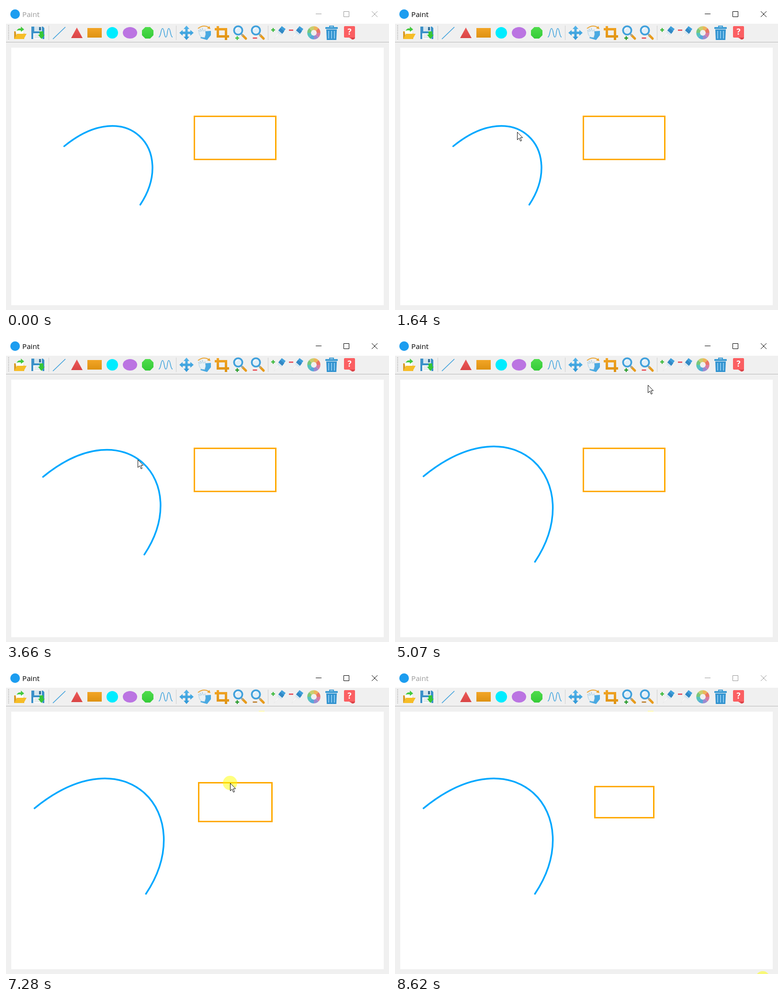
Recreate the animation shown at these times as an HTML page. Size 800x635 px, loop 8.7 s.

```html
<!DOCTYPE html>
<html lang="en">
<head>
<meta charset="utf-8">
<title>Paint</title>
<style>
  html, body { margin: 0; width: 100%; height: 100%; overflow: hidden; background: #f0f0f0; }
  svg { display: block; width: 800px; height: 635px; }
  text { font-family: "Open Sans", "Noto Sans", sans-serif; }
  .line { fill: none; }
</style>
</head>
<body>
<svg viewBox="0 0 800 635" xmlns="http://www.w3.org/2000/svg">
  <defs>
    <linearGradient id="red" x2="0" y2="1"><stop stop-color="#ed5a58"/><stop offset="1" stop-color="#d94545"/></linearGradient>
    <linearGradient id="orange" x2="0" y2="1"><stop stop-color="#f2a526"/><stop offset="1" stop-color="#de9212"/></linearGradient>
    <linearGradient id="green" x2="0" y2="1"><stop stop-color="#4fdc4c"/><stop offset="1" stop-color="#35cb38"/></linearGradient>
    <linearGradient id="blue" x2="0" y2="1"><stop stop-color="#55b5ea"/><stop offset="1" stop-color="#2f97d6"/></linearGradient>
    <g id="lens">
      <path d="M6 5L13 12" stroke="#e79b1c" stroke-width="5" stroke-linecap="round"/>
      <path d="M3 2L7 6" stroke="#9aa7b0" stroke-width="3"/>
      <circle cx="-3" cy="-5" r="8.7" fill="#e3eff7" stroke="#3fa0dc" stroke-width="3.6"/>
      <path class="line" d="M-8 -6Q-7 -10 -3 -10" stroke="#fff" stroke-width="1.5"/>
    </g>
    <g id="pin">
      <path d="M0 4L-9 13L-7 9L-2 2Z" fill="#fff" stroke="#e2e2e2" stroke-width=".7"/>
      <path d="M0 -5L7 -14L15 -8L8 2Z" fill="#3e9fdb"/>
      <path d="M0 -5L4 -10L12 -3L8 2Z" fill="#3288c4"/>
      <path d="M-1 -4L8 3L6 5L-2 -1Z" fill="#d3e6f2"/>
    </g>
  </defs>

  <rect width="800" height="635" fill="#f0f0f0"/>
  <rect width="800" height="37" fill="#fff"/>
  <circle cx="19" cy="17" r="10" fill="#1c9df0"/>
  <g id="caption">
    <text x="34" y="23" font-size="15.2" fill="currentColor">Paint</text>
    <path class="line" d="M647 16.5H659M705.5 11.5H716.5V22.5H705.5ZM764 11L776 23M776 11L764 23" stroke="currentColor"/>
  </g>

  <path d="M0 75.5H800" stroke="#b8b8b8"/>
  <path d="M5.5 40V71" stroke="#a5a5a5" stroke-width="1.6" stroke-dasharray="1.5 2"/>
  <path d="M89.5 41V71M355.5 41V71M547.5 41V71" stroke="#d0d0d0"/>

  <g transform="translate(30 56)">
    <path d="M-13 13V-3H-6L-4 0H8V13Z" fill="#d99a22"/>
    <path d="M-10 -6L6 -7L8 7H-8Z" fill="#fff" stroke="#ddd" stroke-width=".6"/>
    <path d="M-8 -4Q-5 -10 1 -9V-13L8 -7L1 -2V-5Q-4 -6 -8 -4Z" fill="#45c93f"/>
    <path d="M-7 2H13L7 13H-13Z" fill="#f6bd27"/>
  </g>
  <g transform="translate(67 56)">
    <path d="M-14 -13H10L13 -10V13H-14Z" fill="#3b91c9"/>
    <rect x="-8" y="-13" width="16" height="10" fill="#d6e5ee"/>
    <rect x="2" y="-12" width="4" height="7" fill="#316e98"/>
    <rect x="-10" y="1" width="19" height="12" fill="#fff"/>
    <path d="M-8 4H7M-8 7H5M-8 10H6" stroke="#b9c7cf"/>
    <path d="M3 -3H11V4H14L7 13L0 4H3Z" fill="#36c637"/>
  </g>
  <path d="M98 69L124 44" stroke="#3ca0dc" stroke-width="1.6"/>
  <path d="M148 45L160 67H136Z" fill="url(#red)"/>
  <rect x="170" y="46" width="30" height="20" fill="url(#orange)"/>
  <circle cx="222" cy="56" r="12" fill="#00ecff"/>
  <ellipse cx="259" cy="56" rx="15" ry="12" fill="#bb74e2"/>
  <path d="M291 44H301L308 51V61L301 68H291L284 61V51Z" fill="url(#green)"/>
  <path class="line" d="M319 65C324 65 323 47 327 47S330 65 334 65S336 47 340 47S343 65 348 65" stroke="#48a7de" stroke-width="1.6"/>
  <path transform="translate(377 56)" fill="url(#blue)" d="M0 -15L6 -8H2.5V-2.5H8V-6L15 0L8 6V2.5H2.5V8H6L0 15L-6 8H-2.5V2.5H-8V6L-15 0L-8 -6V-2.5H-2.5V-8H-6Z"/>
  <g transform="translate(414 56)">
    <path d="M-1 -3L14 -4L14 5L6 15L-8 11Z" fill="#48a9e2"/>
    <path d="M-12 -6L-8 -2L-9 -9L-5 -3L-4 -10L-1 -3L2 -7L3 3L1 10L-6 9L-10 4Z" fill="#e8f1f6" stroke="#9ec6dd" stroke-width=".8"/>
    <path class="line" d="M-13 -9Q-1 -18 10 -11" stroke="#eaa12a" stroke-width="1.8"/>
    <path d="M13 -8L6 -9L11 -14Z" fill="#eaa12a"/>
  </g>
  <path transform="translate(451 56)" class="line" d="M-15 -7.5H8.5V15M-8.5 -14V7.5H15" stroke="url(#orange)" stroke-width="5"/>
  <use href="#lens" x="488" y="56"/>
  <path id="plus" d="M479 67H487M483 63V71" stroke-width="2.4"/>
  <use href="#lens" x="525" y="56"/>
  <path id="minus" d="M515.5 67H524.5" stroke-width="2.6"/>
  <use href="#pin" x="569" y="56"/>
  <path d="M554 50H562M558 46V54" stroke="#3cba3c" stroke-width="2.5"/>
  <use href="#pin" x="606" y="56"/>
  <path d="M591 50.5H600" stroke="#e64a55" stroke-width="2.6"/>
  <g id="wheel" transform="translate(643 56)"/>
  <g transform="translate(680 56)">
    <path class="line" d="M-4 -11V-14H4V-11" stroke="#3a9bd4" stroke-width="2"/>
    <rect x="-13" y="-12" width="26" height="4" rx="1" fill="#3a9bd4"/>
    <path d="M-11 -7H11L10 15H-10Z" fill="#3494d0"/>
    <path d="M-6 -4V12M0 -4V12M6 -4V12" stroke="#8ccaf0" stroke-width="2"/>
  </g>
  <path d="M708 42H727Q729 42 729 44V67Q728 70 723 70L717 66H708Q706 66 706 64V44Q706 42 708 42Z" fill="#fb5f62"/>
  <path d="M717 66Q722 67 723 70Q728 70 729 66Z" fill="#d94248"/>
  <text x="717.5" y="60" font-size="17" font-weight="700" text-anchor="middle" fill="#fff">?</text>

  <rect x="11" y="87" width="778" height="538" fill="#fff"/>
  <path id="trace" d="M528 86H540" stroke="#fff9b0" stroke-width="2"/>
  <path id="curve" class="line" d="M121.5 293C252.6 185.9 355.8 301.7 280.5 415" stroke="#00a8ff" stroke-width="3.5" stroke-linecap="round" vector-effect="non-scaling-stroke"/>
  <path id="box" class="line" stroke="#ffaa00" stroke-width="3"/>

  <g id="pointer">
    <circle id="press" r="15" fill="#ff0" fill-opacity=".5"/>
    <path d="M.5 .5V16.5L4.2 13L7 19.3L9.4 18.2L6.7 12H11.6Z" fill="#fff" stroke="#111"/>
  </g>
</svg>
<script>
const LOOP = 8700, TICK = 78;
const $ = id => document.getElementById(id);

// Pointer runs: start time, then one position per tick; the last one holds.
const runs = [
  [0, "768,644"],
  [70, "641,518 600,420 555,290 510,165 480,95 468,66 484,63"],
  [1090, "482,72 460,105 410,165 340,222 275,258 239,265 246,264 255,263"],
  [1870, "255,263 258,262 261,262 263,262"],
  [2340, "263,262 265,261 267,260 269,260"],
  [3120, "272,258 275,257"],
  [3500, "275,257 275,255 275,254"],
  [4280, "275,254 276,254 278,253 280,253"],
  [4670, "284,248 318,228 385,185 455,140 505,112 528,98 535,80 532,69 529,73"],
  [5790, "526,84 512,120 494,160 480,196 472,218 470,224"],
  [6430, "468,231"],
  [7050, "468,235"],
  [7280, "468,236"],
  [7510, "468,238"],
  [7750, "468,239"],
  [7910, "468,239 468,239 480,262 540,345 625,455 700,555 768,644"]
].map(([start, path]) => ({ start, points: path.split(" ") }));

const presses = [
  [780, 860], [1870, 1950], [2340, 2420], [2810, 2970], [3500, 3580], [4280, 4360],
  [5550, 5630], [6660, 6740], [7280, 7380], [7910, 7990], [8620, LOOP]
];
const zoomIns = [2420, 2970, 3580, 4360];
const zoomOuts = [6740, 7380, 7990];

const passed = (times, t) => times.filter(time => time <= t).length;

function pointerAt(t) {
  const run = runs.findLast(r => r.start <= t);
  const step = Math.floor((t - run.start) / TICK);
  return run.points[Math.min(step, run.points.length - 1)];
}

function boxPath(scale) {
  const edge = (center, half) => Math.round(center + half * scale) + 0.5;
  const [left, right] = [-85, 85].map(h => edge(478.47, h));
  const [top, bottom] = [-45, 45].map(h => edge(275.47, h));
  return `M${left} ${top}H${right}V${bottom}H${left}Z`;
}

function drawWheel() {
  const colors = ["#edb65a", "#ea7564", "#d77ba4", "#9a8bd0", "#55a9da", "#55c3bd", "#7bc77a", "#c8cf70"];
  const at = (i, r) => {
    const a = i * 2 * Math.PI / colors.length - Math.PI / 2;
    return `${r * Math.cos(a)} ${r * Math.sin(a)}`;
  };
  $("wheel").innerHTML = colors.map((color, i) =>
    `<path fill="${color}" d="M${at(i, 6)}L${at(i, 13.7)}A13.7 13.7 0 0 1 ${at(i + 1, 13.7)}L${at(i + 1, 6)}A6 6 0 0 0 ${at(i, 6)}"/>`
  ).join("");
}

function render(t) {
  $("caption").style.color = t >= 780 && t < 8620 ? "#000" : "#999";
  $("plus").style.stroke = t < 780 ? "#42c544" : "#279b2b";
  $("minus").style.stroke = t < 6660 ? "#e84850" : "#bd7c28";
  $("trace").style.visibility = t < 5630 ? "hidden" : "visible";
  const zoom = 1.1 ** passed(zoomIns, t);
  $("curve").setAttribute("transform", `translate(255 302) scale(${zoom}) translate(-255 -302)`);
  $("box").setAttribute("d", boxPath(0.9 ** passed(zoomOuts, t)));
  $("pointer").setAttribute("transform", `translate(${pointerAt(t)})`);
  $("press").style.visibility = presses.some(([on, off]) => t >= on && t < off) ? "visible" : "hidden";
}

drawWheel();
const begin = performance.now();
function frame() {
  render((performance.now() - begin) % LOOP);
  requestAnimationFrame(frame);
}
frame();
</script>
</body>
</html>
```
